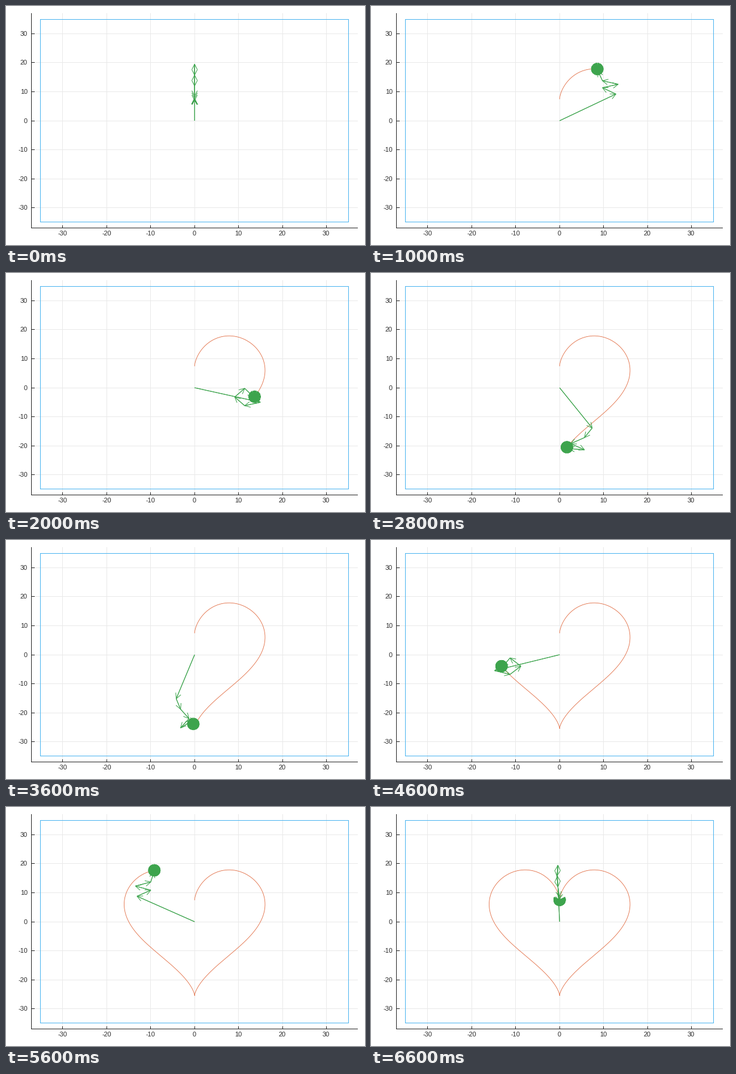
These frames come from a looping animation (600 px wide and 400 px high, 6670 ms). A matplotlib script:

```python
import numpy as np
import matplotlib.pyplot as plt
from matplotlib.animation import FuncAnimation
from matplotlib.collections import LineCollection

W, H, DPI = 600, 400, 100
CX, CY = 315.2, 192.0              # where the data origin sits, in pixels
SX, SY = 546 / 74.2, 360 / 74.2    # pixels per data unit
FRAMES, STEPS = 100, 199
HEAD, WING = 9.1, 4.6              # arrowhead depth and half width
PX = 72 / DPI                      # one pixel in points
INK, GRID, BLUE = "#262626", "#e9e9e9", "#4ab4f0"

# Fourier terms of a heart; every other frequency keeps a tiny residue.
MAIN = {-1: 15.75, 1: 3.75, 2: -3.75, -2: -3.75, -3: -3.5,
        4: -0.75, -4: -0.75, 3: 0.5}
REST = [n for n in range(-50, 51) if n not in MAIN]
FREQ = np.array(list(MAIN) + REST)
COEF = 1j * np.array(list(MAIN.values()) + [1e-5] * len(REST))


def to_px(z):
    return np.column_stack([CX + SX * z.real, CY - SY * z.imag])


def heart(t):
    x = 16 * np.sin(t) ** 3
    y = (19.5 * np.cos(t) - 7.5 * np.cos(2 * t)
         - 3 * np.cos(3 * t) - 1.5 * np.cos(4 * t))
    return x + 1j * y


def arrows(t):
    """Shafts and open heads of the arrow chain at angle t."""
    vec = COEF * np.exp(1j * FREQ * t)
    pts = to_px(np.concatenate([[0], np.cumsum(vec)]))
    d = np.column_stack([SX * vec.real, -SY * vec.imag])
    d /= np.hypot(d[:, 0], d[:, 1])[:, None]
    side = np.column_stack([-d[:, 1], d[:, 0]])
    tip = pts[1:]
    back = tip - HEAD * d
    heads = np.stack([back + WING * side, tip, back - WING * side], axis=1)
    shafts = list(np.stack([pts[:-1], tip], axis=1)[:len(MAIN)])
    return shafts * 2 + list(heads)    # shafts are stroked twice


fig = plt.figure(figsize=(W / DPI, H / DPI), dpi=DPI, facecolor="white")
ax = fig.add_axes([0, 0, 1, 1])
ax.set_xlim(0, W)
ax.set_ylim(H, 0)
ax.axis("off")


def line(x, y, color, z=1):
    ax.plot(x, y, color=color, lw=PX, zorder=z, snap=False,
            solid_capstyle="butt")


def label(x, y, value, align):
    ax.text(x, y, str(value), ha=align, va="baseline", color="#2b2b2b",
            family="Liberation Sans", fontsize=11 * PX)


for v in range(-30, 31, 10):
    x = np.floor(CX + SX * v) + 0.5
    y = np.floor(CY - SY * v) + 0.5
    line([x, x], [12, 372], GRID, z=0)
    line([42, 588], [y, y], GRID, z=0)
    line([x, x], [367, 372], INK, z=2)
    line([42, 48], [y, y], INK, z=2)
    label(x - 0.5, 384, v, "center")
    label(36, y + 3.5, v, "right")
line([42.5, 42.5], [12, 372], INK, z=2)
line([42, 588], [371.5, 371.5], INK, z=2)

# Bounding box
for y in (22.5, 361.5):
    line([57, 573], [y, y], BLUE)
for x in (57.5, 572.5):
    line([x, x], [22, 362], BLUE)

trace, = ax.plot([], [], color="#e26f46", lw=0.85 * PX, zorder=3, snap=False)
chain = LineCollection([], colors="#3da44d", linewidths=PX, zorder=4)
chain.set_snap(False)
ax.add_collection(chain, autolim=False)


def draw(i):
    k = 2 * i
    path = to_px(heart(2 * np.pi * np.arange(k + 1) / STEPS))
    trace.set_data(path[:, 0], path[:, 1])
    chain.set_segments(arrows(2 * np.pi * k / STEPS))
    return trace, chain


# 15 frames per second
anim = FuncAnimation(fig, draw, frames=FRAMES, interval=66.666,
                     repeat=True, repeat_delay=0)
plt.show()
```
